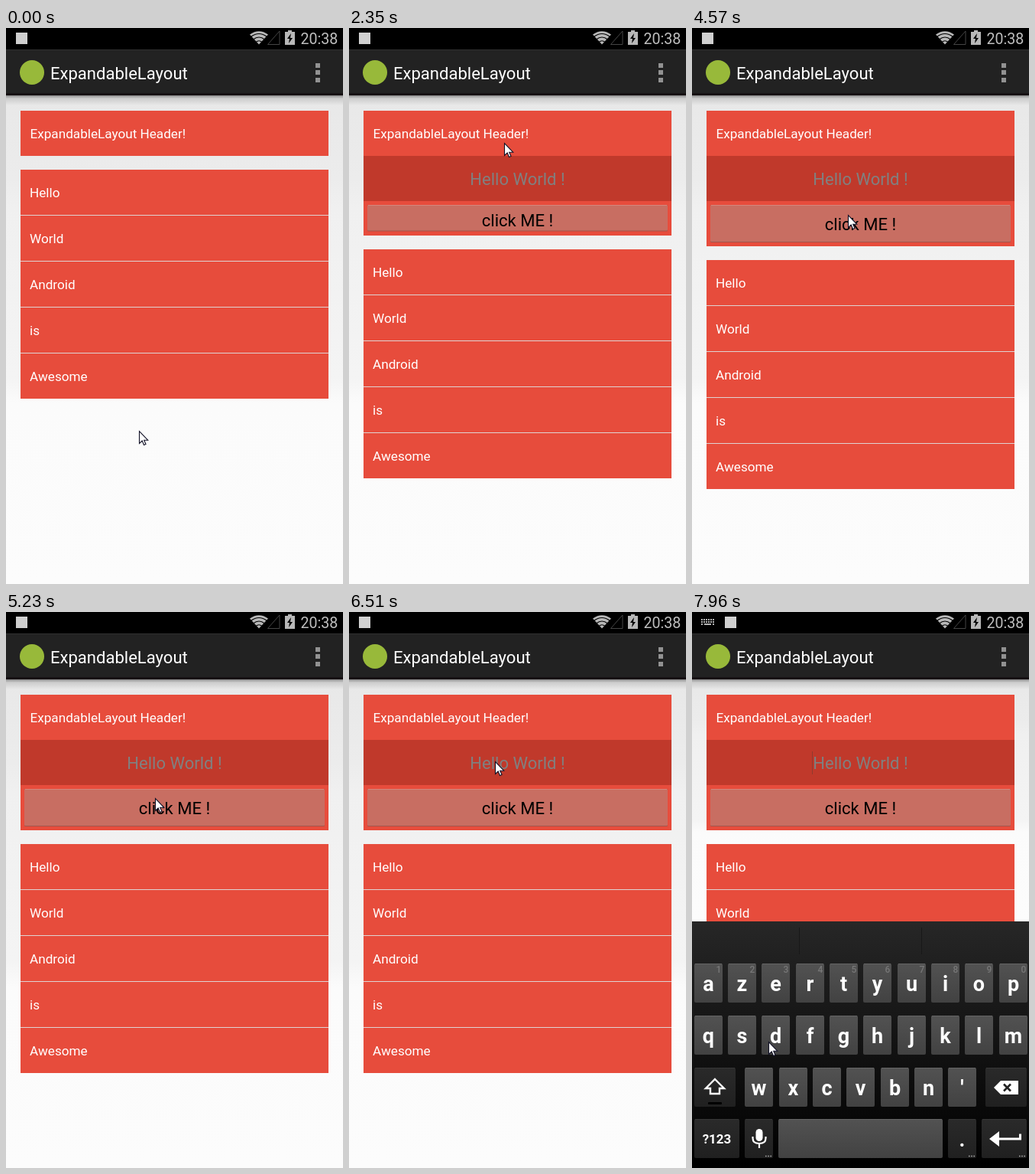
An HTML page for the animation above (8 s loop, 441 px wide and 726 px high).

```html
<!DOCTYPE html>
<html lang="en">
<head>
<meta charset="utf-8">
<title>ExpandableLayout</title>
<style>
  html, body { margin: 0; width: 100%; height: 100%; overflow: hidden; background: #fcfcfc; }
  svg { display: block; width: 441px; height: 726px; font-family: Roboto, sans-serif; }
  .big { font-size: 22.05px; }
  .item { font-size: 17.15px; fill: #fff; }
  .mid { text-anchor: middle; }
  .key { font-size: 27px; font-weight: 700; fill: #fff; text-anchor: middle; }
  .hint { font-size: 12px; fill: #777; font-weight: 500; text-anchor: middle; }
</style>
</head>
<body>
<svg viewBox="0 0 441 726">
  <defs>
    <linearGradient id="page" x2="0" y2="1">
      <stop offset="0" stop-color="#e8e8e8"/>
      <stop offset=".17" stop-color="#ececec"/>
      <stop offset=".23" stop-color="#f0f0f0"/>
      <stop offset=".58" stop-color="#f4f4f4"/>
      <stop offset=".63" stop-color="#fbfbfb"/>
      <stop offset="1" stop-color="#fcfcfc"/>
    </linearGradient>
    <linearGradient id="shade" x2="0" y2="1">
      <stop offset="0" stop-opacity=".4"/>
      <stop offset=".3" stop-opacity=".12"/>
      <stop offset="1" stop-opacity="0"/>
    </linearGradient>
    <linearGradient id="board" x2="0" y2="1">
      <stop offset="0" stop-color="#272727"/>
      <stop offset=".2" stop-color="#1e1e1e"/>
      <stop offset="1" stop-color="#000"/>
    </linearGradient>
    <linearGradient id="light" x2="0" y2="1">
      <stop offset="0" stop-color="#525252"/>
      <stop offset="1" stop-color="#424242"/>
    </linearGradient>
    <linearGradient id="dark" x2="0" y2="1">
      <stop offset="0" stop-color="#2a2a2a"/>
      <stop offset="1" stop-color="#202020"/>
    </linearGradient>
  </defs>

  <rect id="back" y="88" width="441" height="638" fill="url(#page)"/>
  <rect y="88" width="441" height="13" fill="url(#shade)"/>

  <!-- status bar and action bar -->
  <rect width="441" height="28" fill="#000"/>
  <rect y="28" width="441" height="60" fill="#222"/>
  <rect y="28" width="441" height="1" fill="#303030"/>
  <rect y="85" width="441" height="3" fill="#161113"/>
  <rect id="mail" x="13" y="6" width="15" height="15" fill="#d0d0d0"/>
  <g id="typing" stroke="#b4b4b4" stroke-width="2" stroke-dasharray="2 1">
    <path d="M12 10h18M12 13h18M12 16h3"/><path d="M16 16h9" stroke-dasharray="none"/><path d="M27 16h3"/>
  </g>
  <path d="M331 21.5L319 8.5Q331 0 343 8.5Z" fill="#b8b8b8"/>
  <path d="M320.500 11.500Q331 3.500 341.500 11.500M323.500 15Q331 9 338.500 15M327 18.500Q331 15 335 18.500" fill="none" stroke="#000" stroke-width="1.200"/>
  <path d="M342.500 21.500H358V4Z" fill="none" stroke="#454545"/>
  <path d="M365 5h4V3h5v2h4v17h-13Z" fill="#b8b8b8"/>
  <path d="M373 7l-5 7h3l-1 6 5-7h-3Z" fill="#000"/>
  <text x="385.500" y="21" font-size="19.600" fill="#bebebe">20:38</text>
  <circle cx="34" cy="58" r="16" fill="#98b93a"/>
  <text class="big" x="58" y="67" fill="#fff">ExpandableLayout</text>
  <path d="M405 46h6v6h-6zM405 55h6v6h-6zM405 65h6v6h-6z" fill="#929292"/>

  <!-- expandable header -->
  <rect id="card" x="19" y="108" width="403" height="59" fill="#e74c3c"/>
  <text class="item" x="31.500" y="144">ExpandableLayout Header!</text>
  <g id="content">
    <rect x="19" y="167" width="403" height="59" fill="#c0392b"/>
    <text class="big mid" x="220.500" y="205" fill="#808080">Hello World !</text>
    <rect id="caret" x="157" y="182" width="1" height="30" fill="#8f3a2e"/>
    <rect id="edge" x="24" y="231" width="393" height="49" rx="1.500" fill="#a2564c"/>
    <rect id="button" x="24" y="231" width="393" height="48" rx="1.500" fill="#c86e62"/>
    <rect x="25" y="231" width="391" height="1" fill="#d4877d"/>
    <text id="label" class="big mid" x="220.500" y="264">click ME !</text>
  </g>
  <g id="list"></g>

  <g id="keyboard">
    <rect y="404" width="441" height="322" fill="url(#board)"/>
    <path d="M140.500 412v35M300.500 412v35" stroke="#181818"/>
    <g id="keys"></g>
    <path d="M30 610l12 12h-6v7h-12v-7h-6Z" fill="none" stroke="#fff" stroke-width="2.400"/>
    <rect x="21" y="640" width="18" height="3" rx="1" fill="#000"/>
    <path d="M395 621l9-9h23v18h-23Z" fill="#fff"/>
    <path d="M408 616.500l9 9m0-9l-9 9" stroke="#222" stroke-width="2.600"/>
    <rect x="83.500" y="675" width="9" height="16" rx="4.500" fill="#fff"/>
    <path d="M79.500 685v2q0 7 8.500 7t8.500-7v-2M88 694v6" fill="none" stroke="#fff" stroke-width="2.200"/>
    <path d="M389 688l13-10v8.500h26v-5h3v8h-29v8.500Z" fill="#fff"/>
    <path d="M96 710.500h8M362 710.500h8M428 710.500h8" stroke="#aaa" stroke-width="1.500" stroke-dasharray="1.600 1.600"/>
  </g>

  <path id="pointer" d="M.5 .7V16.500L4.200 13 6.500 18.500 9 17.500 6.700 12.200H11.700Z" fill="#fff" stroke="#111126" stroke-width="1.100"/>
</svg>
<script>
const LOOP = 8000;
const $ = id => document.getElementById(id);
const set = (id, attrs) => {
  for (const name in attrs) $(id).setAttribute(name, attrs[name]);
};
const add = (parent, tag, attrs, text = '') => {
  const el = document.createElementNS('http://www.w3.org/2000/svg', tag);
  for (const name in attrs) el.setAttribute(name, attrs[name]);
  el.textContent = text;
  $(parent).append(el);
};

['Hello', 'World', 'Android', 'is', 'Awesome'].forEach((word, i) => {
  const y = 185 + 60 * i;
  add('list', 'rect', { x: 19, y, width: 403, height: 59, fill: '#e74c3c' });
  if (i) add('list', 'rect', { x: 19, y: y - 1, width: 403, height: 1, fill: '#dfd3d2' });
  add('list', 'text', { class: 'item', x: 31, y: y + 36 }, word);
});

function key(x, y, width, fill, text = '', size = 27) {
  add('keys', 'rect', { x, y, width, height: 51, rx: 2, fill: `url(#${fill})` });
  add('keys', 'rect', { x: x + 1, y, width: width - 2, height: 1, fill: fill === 'light' ? '#646464' : '#363636' });
  if (text) {
    const baseline = y + (size < 27 ? 32 : 36);
    add('keys', 'text', { class: 'key', x: x + width / 2, y: baseline, style: `font-size:${size}px` }, text);
  }
}
const column = i => Math.round(2.8 + 44.32 * i);
[['azertyuiop', 459, 0], ['qsdfghjklm', 527, 0], ["wxcvbn'", 595, 1.5]].forEach(([row, y, shift]) => {
  [...row].forEach((letter, i) => key(column(i + shift), y, 37, 'light', letter));
});
for (let i = 0; i < 10; i++) {
  add('keys', 'text', { class: 'hint', x: column(i) + 32, y: 471 }, (i + 1) % 10);
}
key(3, 595, 54, 'dark');
key(384, 595, 54, 'dark');
key(3, 662, 59, 'dark', '?123', 17);
key(69, 662, 37, 'dark');
key(113, 662, 215, 'light');
key(335, 662, 37, 'dark', '.');
key(379, 662, 59, 'dark');

// Pointer legs: first step, last step, step count, start, bend, end
const legs = [
  [160, 1130, 8, [174, 526], [93, 515], [153, 269]],
  [1250, 1790, 5, [153, 269], [172, 205], [203, 150]],
  [3430, 3860, 4, [203, 150], [203, 169], [203, 188]],
  [4300, 4570, 3, [203, 188], [203, 216], [204, 244]],
  [4960, 5230, 3, [204, 244], [200, 244], [195, 243]],
  [6110, 6510, 4, [195, 243], [193, 219], [191, 195]],
  [7220, 7960, 6, [191, 195], [70, 330], [100, 561]]
];

function pointerAt(t) {
  const [from, to, count, a, b, c] = legs.findLast(leg => t >= leg[0]) || legs[0];
  if (t < from) return a;
  const step = Math.floor((t - from) / (to - from) * (count - 1) + 0.08) + 1;
  const p = Math.min(1, step / count);
  const u = 0.5 * p + 0.5 * p * p * (3 - 2 * p);
  return a.map((v, i) => v * (1 - u) ** 2 + 2 * b[i] * u * (1 - u) + c[i] * u * u);
}

function draw(t) {
  const within = (from, to = LOOP) => t >= from && t < to;
  const show = on => ({ visibility: on ? 'visible' : 'hidden' });
  const open = t >= 2350;
  const missing = within(2350, 2480) ? 14.5 : 0;
  const pressed = within(4700, 4960) || within(5380, 5980);
  const docked = t >= 6940;

  set('content', { display: open ? 'inline' : 'none' });
  set('card', { height: open ? Math.round(177 - missing) : 59 });
  set('edge', { height: 49 - missing });
  set('button', { height: 48 - missing, fill: pressed ? '#d39a92' : '#c86e62' });
  set('label', { y: missing ? 259 : 264 });
  set('list', { transform: `translate(0 ${open ? Math.floor(118 - missing + 0.5) : 0})` });

  set('caret', show(t >= 6800));
  set('keyboard', { ...show(t >= 6800), opacity: docked ? 1 : 0.53, transform: `translate(0 ${docked ? 0 : 68})` });
  set('back', { height: docked ? 316 : 638 });
  set('typing', show(docked));
  set('mail', { x: docked ? 43 : 13 });

  const [x, y] = pointerAt(t).map(Math.round);
  set('pointer', { transform: `translate(${x} ${y})` });
}

const start = performance.now();
function tick() {
  draw((performance.now() - start) % LOOP);
  requestAnimationFrame(tick);
}
tick();
</script>
</body>
</html>
```
